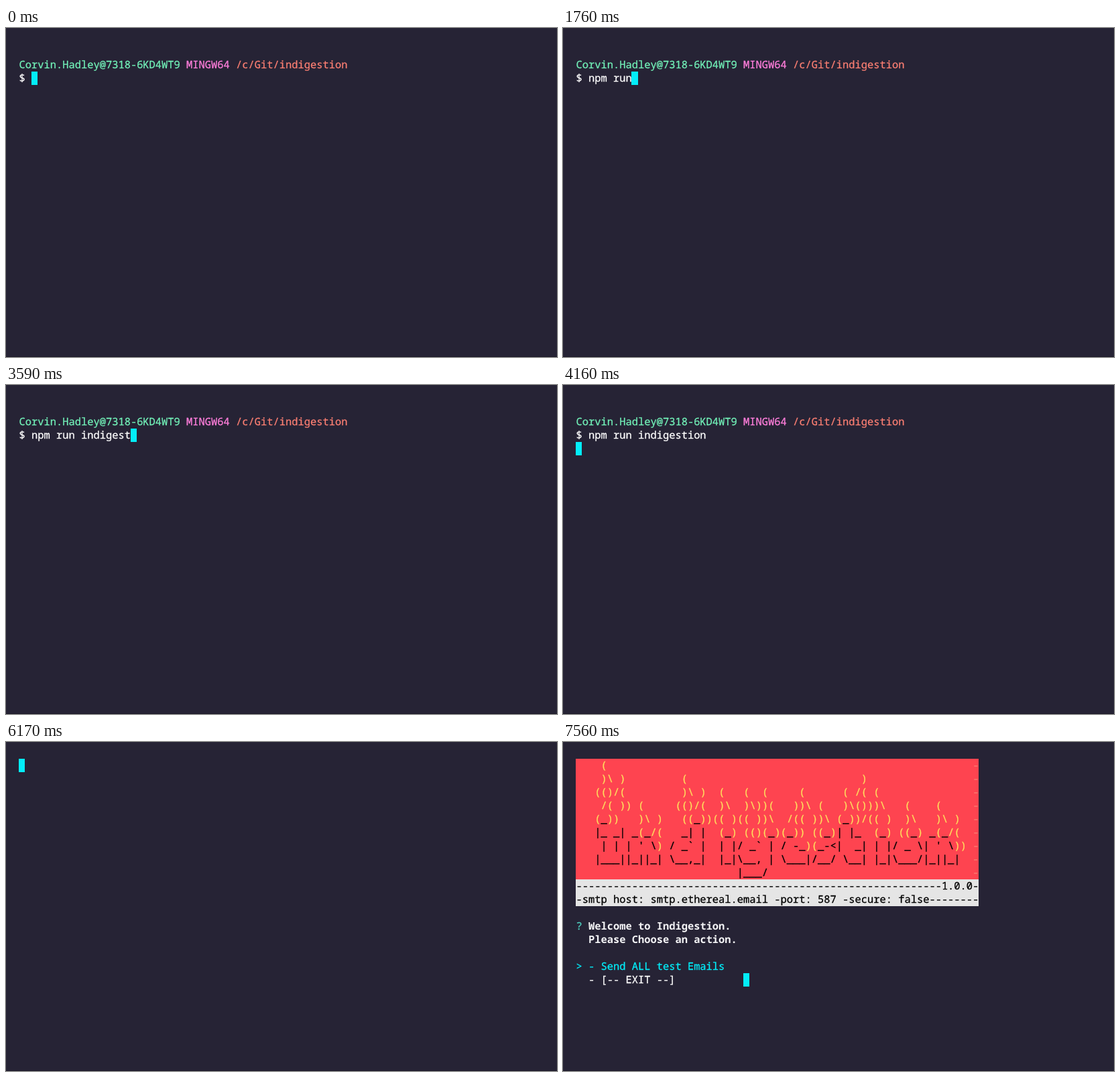
An HTML page for the animation above (8 s loop, 822 by 491 pixels).

```html
<!DOCTYPE html>
<html lang="en">
<head>
<meta charset="utf-8">
<title>Terminal session</title>
<style>
  html, body { margin: 0; width: 100%; height: 100%; overflow: hidden; background: #262335; }
  body { position: relative; box-sizing: border-box; border-bottom: 1px solid #1b1927; }
  #screen {
    position: absolute; left: 19px; top: 25px; color: #fff; white-space: pre;
    font: 15.4167px "Noto Sans Mono", "DejaVu Sans Mono", monospace;
    text-rendering: geometricPrecision; font-variant-ligatures: none; font-kerning: none;
    -webkit-text-stroke: 0.3px;
  }
  #screen div { height: 20px; line-height: 20px; text-indent: 0.5px; }
  #screen div.fire { width: 601px; background: #fe4450; color: #000; }
  #screen div.info { width: 601px; background: #e5e5e5; color: #000; }
  #cursor { position: absolute; height: 20px; background: #03edf9; }
  .green { color: #72f1b8; }
  .pink { color: #ff7edb; }
  .coral { color: #f97e72; }
  .yellow { color: #fede5d; }
  .cyan { color: #03edf9; }
  .blue { color: #57b7d8; }
  .teal { color: #4fd0c0; }
  b { color: #f4f4f6; -webkit-text-stroke: 0; }
</style>
</head>
<body>
<pre id="banner" hidden>
    (
    )\ )         (                            )
   (()/(         )\ )  (   (  (     (      ( /( (
    /( )) (     (()/(  )\  )\))(   ))\ (   )\()))\   (    (
   (_))   )\ )   ((_))(( )(( ))\  /(( ))\ (_))/(( )  )\   )\ )
   |_ _| _(_/(   _| |  (_) (()(_)(_)) ((_)| |_  (_) ((_) _(_/(
    | | | ' \) / _` |  | |/ _` | / -_)(_-&lt;|  _| | |/ _ \| ' \))
   |___||_||_| \__,_|  |_|\__, | \___|/__/ \__| |_|\___/|_||_|
                          |___/
</pre>
<div id="screen"></div>
<div id="cursor"></div>
<script>
const LOOP = 8000, CELL = 9.25, ROW = 20, LEFT = 19, TOP = 25, COLS = 65;
const COMMAND = "npm run indigestion";
const KEY_TIMES = [530, 730, 850, 960, 1390, 1550, 1760, 1940, 2170, 2370,
  2580, 2740, 2980, 3140, 3340, 3590, 3680, 3770, 3850];
const ENTER = 4160, NPM_OUTPUT = 5570, CLEAR = 6170, MENU = 6220, SELECT = 7510;

const screen = document.getElementById("screen");
const cursor = document.getElementById("cursor");

const escapeHtml = text => text.replace(/&/g, "&amp;").replace(/</g, "&lt;").replace(/>/g, "&gt;");
const ink = (color, text) => `<span class="${color}">${escapeHtml(text)}</span>`;
const line = (html = "", style = "") => `<div class="${style}">${html}</div>`;

// Flames are yellow; the lettering below them keeps its black strokes.
function fireLine(text, row) {
  const flames = row < 6 ? /[()\/\\]+|[^()\/\\]+/g : /[()]+|[^()]+/g;
  const isFlame = row < 6 ? /[()\/\\]/ : /[()]/;
  const parts = text.padEnd(COLS - 1).match(flames);
  const html = parts.map(p => isFlame.test(p) ? ink("yellow", p) : escapeHtml(p)).join("");
  return line(html + ink("coral", "-"), "fire");
}

const bannerText = document.getElementById("banner").textContent.replace(/^\n|\n$/g, "");
const header = [
  ...bannerText.split("\n").map(fireLine),
  line("1.0.0-".padStart(COLS, "-"), "info"),
  line("-smtp host: smtp.ethereal.email -port: 587 -secure: false".padEnd(COLS, "-"), "info"),
  line()
];

const prompt = [
  line(),
  line(ink("green", "Corvin.Hadley@7318-6KD4WT9") + " " + ink("pink", "MINGW64") + " " +
    ink("coral", "/c/Git/indigestion"))
];

const npmOutput = [
  line(),
  line(escapeHtml("> indigestion@1.0.0 indigestion C:\\Git\\indigestion")),
  line(escapeHtml("> node ./index.js"))
];

function menu(selected) {
  const send = "- Send ALL test Emails";
  return [
    ...header,
    line(ink(selected ? "teal" : "blue", "?") + " <b>Welcome to Indigestion.</b>"),
    line("  <b>Please Choose an action.</b>" + (selected ? "" : " (Use arrow keys)")),
    line(selected ? "" : ink("cyan", ">")),
    line(selected ? ink("cyan", "> " + send) : "  " + send),
    line("  - [-- EXIT --]")
  ];
}

function stateAt(t) {
  if (t >= SELECT) return { lines: menu(true), col: 27, row: 16 };
  if (t >= MENU) return { lines: menu(false), col: 43, row: 16 };
  if (t >= CLEAR) return { lines: [], col: 0, row: 0 };
  const typed = KEY_TIMES.filter(k => k <= t).length;
  const lines = [...prompt, line("$ " + COMMAND.slice(0, typed))];
  if (t >= NPM_OUTPUT) return { lines: [...lines, ...npmOutput], col: 0, row: 7 };
  if (t >= ENTER) return { lines, col: 0, row: 3 };
  return { lines, col: 2 + typed, row: 2 };
}

const cellEdge = col => Math.round(LEFT + col * CELL);

let shown = null;
function draw() {
  const { lines, col, row } = stateAt(performance.now() % LOOP);
  const html = lines.join("");
  if (html !== shown) screen.innerHTML = shown = html;
  cursor.style.left = cellEdge(col) + "px";
  cursor.style.width = cellEdge(col + 1) - cellEdge(col) + "px";
  cursor.style.top = TOP + row * ROW + "px";
  requestAnimationFrame(draw);
}
draw();
</script>
</body>
</html>
```
